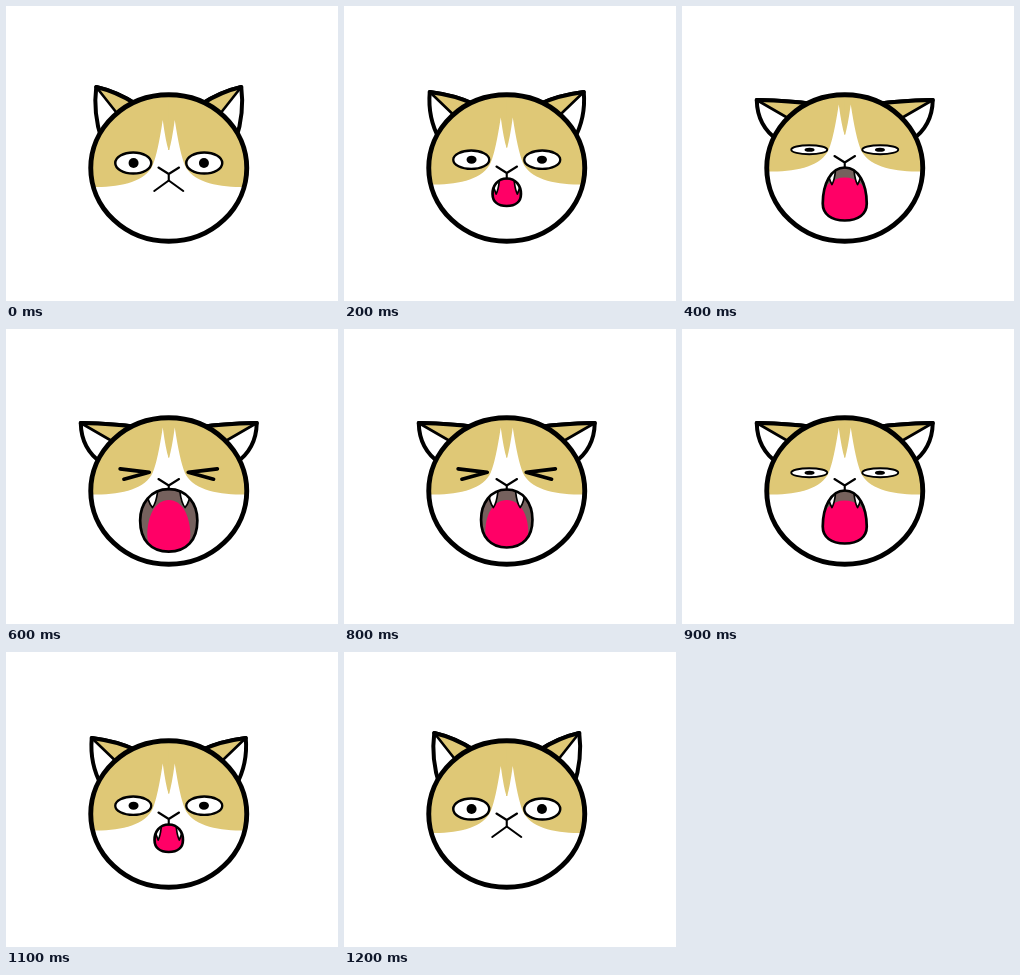
An HTML page with a canvas for the animation above (1.7 s loop, 332 px wide and 295 px high).

```html
<!DOCTYPE html>
<html lang="en">
<head>
<meta charset="utf-8">
<title>Yawning cat</title>
<style>
html, body { margin: 0; width: 100%; height: 100%; overflow: hidden; background: #fff; }
canvas { display: block; }
</style>
</head>
<body>
<canvas id="stage" width="332" height="295"></canvas>
<script>
const ctx = document.getElementById('stage').getContext('2d');
const TAN = '#dfc876', PINK = '#ff0066', GREY = '#75615d', INK = '#000', WHITE = '#fff';
const AXIS = 162.75;

// Poses from resting to the widest yawn. x is measured outward from the axis.
// mouth and tongue: top, bottom, half width, height of the widest part (0..1)
// fang: x, base y, tip y, half width
const poses = [
  { ear: [72.5, 81], patch: 0, eye: [157, 10.6], pupil: 5, nose: 161.5 },
  { ear: [77, 86], patch: -2.5, eye: [153.7, 9.2], pupil: 4, nose: 160.5,
    mouth: [172.5, 200, 14.2, .56], tongue: [172, 202, 16, .55], fang: [10.6, 176, 188, 3] },
  { ear: [88, 94], patch: -12, eye: [145.7, 7.1], pupil: 3, nose: 154,
    mouth: [166.5, 209, 20.5, .62], tongue: [171, 212, 23, .6], fang: [11.6, 168, 181.5, 3.3] },
  { ear: [88, 94], patch: -15.5, eye: [143.7, 4.5], pupil: 2, nose: 150,
    mouth: [161.5, 214.5, 22, .68], tongue: [171.5, 217, 24, .6], fang: [12.8, 164, 178.5, 3.6] },
  { ear: [88, 94], patch: -15.5, nose: 150,
    mouth: [160.5, 218.5, 25.7, .52], tongue: [171, 220, 21.5, .66], fang: [13.4, 163, 178.5, 4.5] },
  { ear: [88, 94], patch: -15.5, nose: 150,
    mouth: [160.2, 222.7, 28.6, .5], tongue: [171, 224, 21.5, .66], fang: [16.3, 163, 178.5, 5.1] }
];

function paint(path, fill, width) {
  if (fill) { ctx.fillStyle = fill; ctx.fill(path); }
  if (width) { ctx.strokeStyle = INK; ctx.lineWidth = width; ctx.stroke(path); }
}

function oval(x, y, rx, ry) {
  const p = new Path2D();
  p.ellipse(x, y, rx, ry, 0, 0, 7);
  return p;
}

function bothSides(draw) {
  for (const side of [-1, 1]) {
    ctx.save();
    ctx.scale(side, 1);
    draw();
    ctx.restore();
  }
}

function clipped(path, draw) {
  ctx.save();
  ctx.clip(path);
  draw();
  ctx.restore();
}

// Rounded pear, narrower at the top
function pear([top, bottom, w, m]) {
  const h = bottom - top, mid = top + h * m, p = new Path2D();
  const upper = mid - h * m * .53, lower = mid + (bottom - mid) * .63;
  p.moveTo(0, top);
  p.bezierCurveTo(w * .64, top, w, upper, w, mid);
  p.bezierCurveTo(w, lower, w * .62, bottom, 0, bottom);
  p.bezierCurveTo(-w * .62, bottom, -w, lower, -w, mid);
  p.bezierCurveTo(-w, upper, -w * .64, top, 0, top);
  return p;
}

function drawEar([x, y]) {
  const top = `Q52 ${y * .7 + 29} 33 98`, fold = `50 ${y * .5 + 69}`;
  paint(new Path2D(`M${x} ${y} ${top} L67 134 Q${x * .75 + 21.5} ${y + 26} ${x} ${y}`), WHITE, 4);
  paint(new Path2D(`M${x} ${y} ${top} L${fold}Z`), TAN);
  paint(new Path2D(`M${x} ${y}L${fold}`), null, 2.6);
  paint(new Path2D(`M${x} ${y} ${top}`), null, 4);
}

// Crosses the axis slightly so that the halves join without a seam
function drawPatch(shift) {
  ctx.translate(0, shift);
  paint(new Path2D('M-.6 60 H100 V181 H72 C46 181 23 175 16 159 Q11 147 6 114 Q3 136 .3 144 H-.6Z'), TAN);
}

function drawEye({ eye, pupil }) {
  if (!eye) return paint(new Path2D('M48.6 139.8L19.5 143.3L44.8 150.2'), null, 3.7);
  const [y, ry] = eye;
  paint(oval(35.5, y, 18, ry), WHITE, 1.4 + ry * .1);
  paint(oval(35.2, y, 5, pupil), INK);
}

function drawMouth({ mouth, tongue, fang }) {
  const shape = pear(mouth), [x, base, tip, w] = fang;
  paint(shape, GREY);
  clipped(shape, () => {
    paint(pear(tongue), PINK);
    bothSides(() => paint(new Path2D(
      `M${x - w} ${base - 3}V${base}Q${x - w * .7} ${tip - 4} ${x} ${tip}` +
      `Q${x + w} ${tip - 6} ${x + w} ${base}V${base - 3}Z`), WHITE, 1.7));
  });
  paint(shape, null, 2.7);
}

function drawCat(pose) {
  const head = oval(0, 162, 78, 73.3), { nose, mouth } = pose;
  ctx.fillStyle = WHITE;
  ctx.fillRect(0, 0, 332, 295);
  ctx.save();
  ctx.translate(AXIS, 0);
  ctx.lineJoin = ctx.lineCap = 'round';
  bothSides(() => drawEar(pose.ear));
  paint(head, WHITE);
  clipped(head, () => bothSides(() => drawPatch(pose.patch)));
  paint(head, null, 4.9);
  bothSides(() => drawEye(pose));
  if (mouth) drawMouth(pose);
  const lip = mouth ? mouth[0] : 174.5;
  paint(new Path2D(`M-10.3 ${nose}L0 ${nose + 6.5}L10.3 ${nose}M0 ${nose + 6.5}V${lip}`), null, 2.1);
  if (!mouth) paint(new Path2D('M-14.5 185L0 174.5L14.5 185'), null, 2.1);
  ctx.restore();
}

function frame(now) {
  const step = Math.floor(now % 1700 / 100);
  // Open one pose per step, hold, then close the same way
  const level = Math.max(0, Math.min(step - 1, 12 - step, 5));
  drawCat(poses[level]);
  requestAnimationFrame(frame);
}
frame(performance.now());
</script>
</body>
</html>
```
